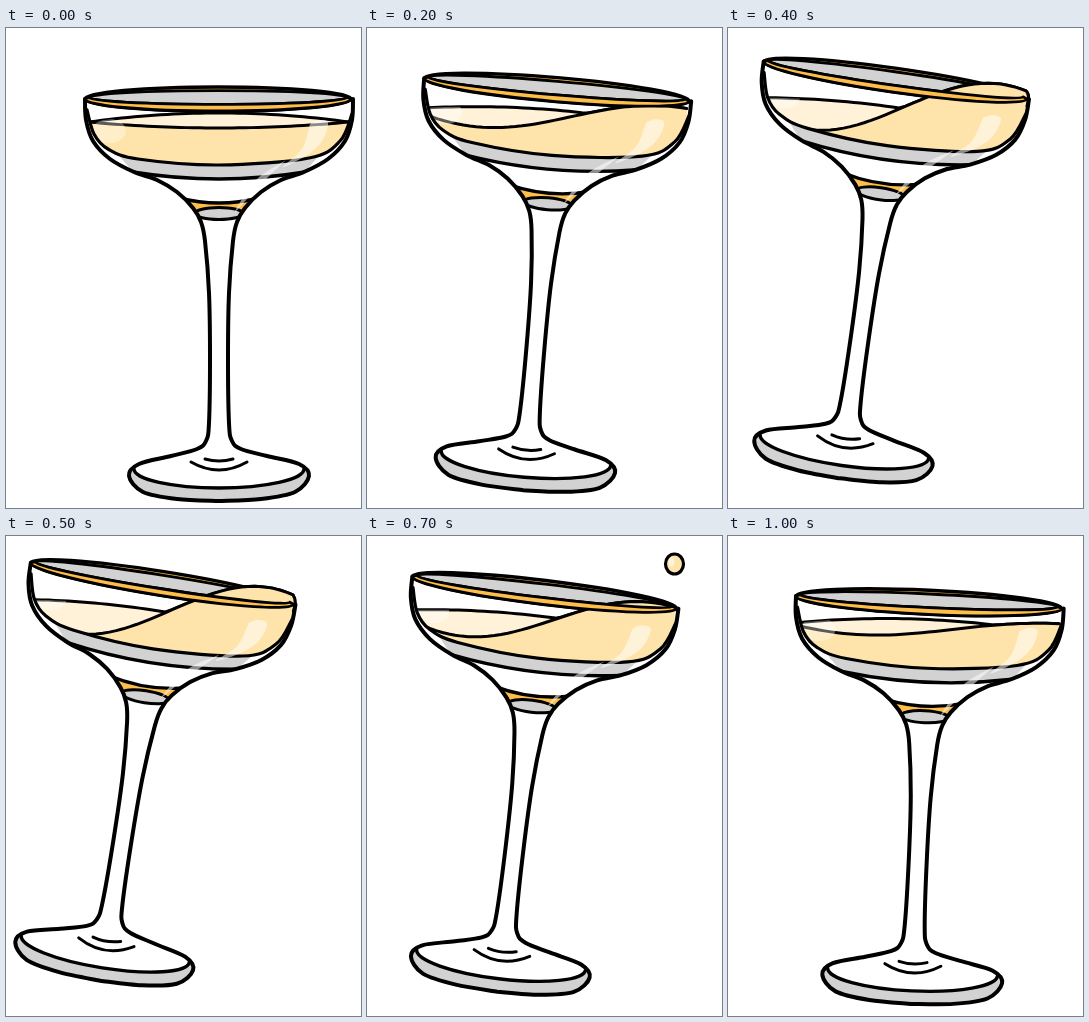
Write an HTML page with a canvas that moves like this. It is 355 px wide and 480 px high and loops after 1100 ms.

```html
<!DOCTYPE html>
<html lang="en">
<head>
<meta charset="utf-8">
<title>Swaying coupe</title>
<style>
html, body { margin: 0; width: 355px; height: 480px; overflow: hidden; background: #fff; }
canvas { display: block; }
</style>
</head>
<body>
<canvas id="stage" width="355" height="480"></canvas>
<script>
const ctx = document.getElementById('stage').getContext('2d');
const GREY = '#d2d2d2', GOLD = '#fdbe4b', WINE = '#fee4aa', PALE = '#fff2d9', INK = '#000';
const LOOP = 1100, STEP = 100, AXIS = 213;

// smooth curve through points, appended to path p
function curve(p, pts, join) {
  if (join) p.lineTo(...pts[0]); else p.moveTo(...pts[0]);
  for (let i = 0; i < pts.length - 1; i++) {
    const a = pts[i - 1] || pts[i], b = pts[i], c = pts[i + 1], d = pts[i + 2] || c;
    p.bezierCurveTo(b[0] + (c[0] - a[0]) / 6, b[1] + (c[1] - a[1]) / 6,
      c[0] - (d[0] - b[0]) / 6, c[1] - (d[1] - b[1]) / 6, c[0], c[1]);
  }
  return p;
}
const line = (...pts) => curve(new Path2D(), pts);

// level arc around the axis that sags in the middle
function sag(half, y, depth) {
  const p = new Path2D();
  p.moveTo(AXIS - half, y);
  p.quadraticCurveTo(AXIS, y + depth * 2, AXIS + half, y);
  return p;
}

function oval(x, y, rx, ry, from = 0, to = Math.PI * 2) {
  const p = new Path2D();
  p.ellipse(x, y, rx, ry, 0, from, to);
  return p;
}

// copy of an open path, closed off at height y between two sides
function closed(path, left, right, y) {
  const p = new Path2D(path);
  p.lineTo(right, y);
  p.lineTo(left, y);
  p.closePath();
  return p;
}

function paint(path, fill, width = 3.4) {
  if (fill) { ctx.fillStyle = fill; ctx.fill(path); }
  if (width) { ctx.lineWidth = width; ctx.strokeStyle = INK; ctx.stroke(path); }
}

function within(shape, work) {
  ctx.save();
  ctx.clip(shape);
  work();
  ctx.restore();
}

// half width and height down the glass
const profile = [[134, 71], [133, 92], [126, 113], [109, 131], [85, 144], [62, 152], [42, 164], [26, 180],
  [18, 194], [14, 213], [10, 265], [9, 330], [10, 395], [13, 413], [22, 421], [48, 428], [80, 436],
  [90, 448], [76, 464], [42, 471], [0, 473]];
const side = sign => profile.map(([half, y]) => [AXIS + sign * half, y]);
const body = curve(curve(new Path2D(), side(-1)), side(1).reverse(), true);

const wall = line([81, 82], [88, 106], [102, 121], [132, 131], [AXIS, 137], [303, 130], [334, 113], [346, 86]);
const room = closed(wall, 81, 352, 40);

function drawBody() {
  paint(body, '#fff', 0);
  within(body, () => {
    const shade = sag(86, 144, 7);
    paint(closed(shade, 70, 355, 78), GREY, 0);
    paint(shade);
    paint(room, '#fff', 0);

    const collar = sag(40, 170, 5);
    paint(closed(collar, 185, 240, 188), GOLD, 0);
    paint(collar);
    paint(oval(AXIS, 185.5, 24, 6), GREY, 3);

    ctx.fillStyle = GREY;
    ctx.fillRect(110, 441, 210, 40);
    paint(oval(AXIS, 441, 85, 19), '#fff', 0);
    paint(oval(AXIS, 441, 85, 19, 0, Math.PI));
  });
  paint(sag(14, 431, 2), null, 3);
  paint(sag(28, 434, 8), null, 3);
}

// a: 0 for still wine, 1 for a full wave against the right side
function drawWine(a) {
  const back = new Path2D(), front = new Path2D();
  for (let s = -1; s <= 1.001; s += 0.05) {
    const x = AXIS + s * 130, dome = 1 - s * s;
    const high = 94 + 2 * a + 6 * dome * Math.max(0, 1 - a) - 36 * a * Math.sin(2.2 * s - 0.2);
    const low = Math.min(high, 94 - 9 * dome + 13 * a);
    front.lineTo(x, high);
    back.lineTo(x, low);
  }
  if (a > 0.9) for (const p of [front, back]) p.quadraticCurveTo(348, 67, 346, 78);

  within(room, () => {
    const surface = closed(back, 70, 352, 145);
    paint(surface, PALE, 0);
    paint(back, null, 3);
    paint(closed(front, 70, 352, 145), WINE, 0);
    paint(front, null, 3);
    within(surface, () => paint(oval(103, 103, 17, 12), 'rgba(255,255,255,.35)', 0));
  });
  within(body, () => paint(wall, null, 3.2));
}

function drawShine() {
  const glow = 'rgba(255,255,255,.55)';
  within(body, () => {
    paint(line([304, 96], [313, 92], [322, 95], [316, 113], [301, 127], [277, 139], [296, 121], [304, 96]), glow, 0);
    paint(line([280, 132], [250, 152], [229, 184], [250, 161], [280, 132]), glow, 0);
  });
}

const outer = [212, 71, 133, 12], inner = [212, 69.5, 129, 6.8];

function drawRim() {
  paint(oval(...outer), GOLD);
  paint(oval(...inner), GREY, 2.8);
}

function drawLip() {
  const lip = oval(...outer, 0, Math.PI);
  const [x, y, rx, ry] = inner;
  lip.ellipse(x, y, rx, ry, 0, Math.PI, 0, true);
  lip.closePath();
  paint(lip, GOLD, 2.8);
  paint(body, null, 4);
}

function drawDrop(x, y) {
  paint(oval(x, y, 9, 10), WINE, 3.2);
  paint(oval(x - 3, y - 2, 3, 4.5), PALE, 0);
}

function drawSplash(x, y) {
  const tear = new Path2D('M-7 0C-2-5 6-6 6 0C6 6-2 5-7 0Z');
  for (let i = 0; i < 4; i++) {
    ctx.save();
    ctx.translate(x, y);
    ctx.rotate((i * 90 - 124) * Math.PI / 180);
    ctx.translate(22, 0);
    paint(tear, WINE, 3);
    ctx.restore();
  }
}

function draw(now) {
  const step = Math.floor((now % LOOP) / STEP);
  // steady lean to the right, quick return that slows down
  const lean = step < 6 ? step : Math.max(10.1 - step, (12 - step) / 2);
  const tilt = 2.9 * lean - 0.22 * lean * lean;

  ctx.fillStyle = '#fff';
  ctx.fillRect(0, 0, 355, 480);
  ctx.lineCap = ctx.lineJoin = 'round';
  ctx.save();
  ctx.translate(212 - 11.2 * lean, 72 - 4.7 * lean);
  ctx.rotate(tilt * Math.PI / 180);
  ctx.translate(-212, -72);
  drawBody();
  drawRim();
  drawWine(Math.min(lean / 4, 1.05));
  drawShine();
  drawLip();
  ctx.restore();

  if (step === 6 || step === 7) drawDrop(299.5 + (step - 6) * 8, 28);
  if (step === 8) drawSplash(315, 30);
}

const start = performance.now();
function tick() {
  draw(performance.now() - start);
  requestAnimationFrame(tick);
}
tick();
</script>
</body>
</html>
```
